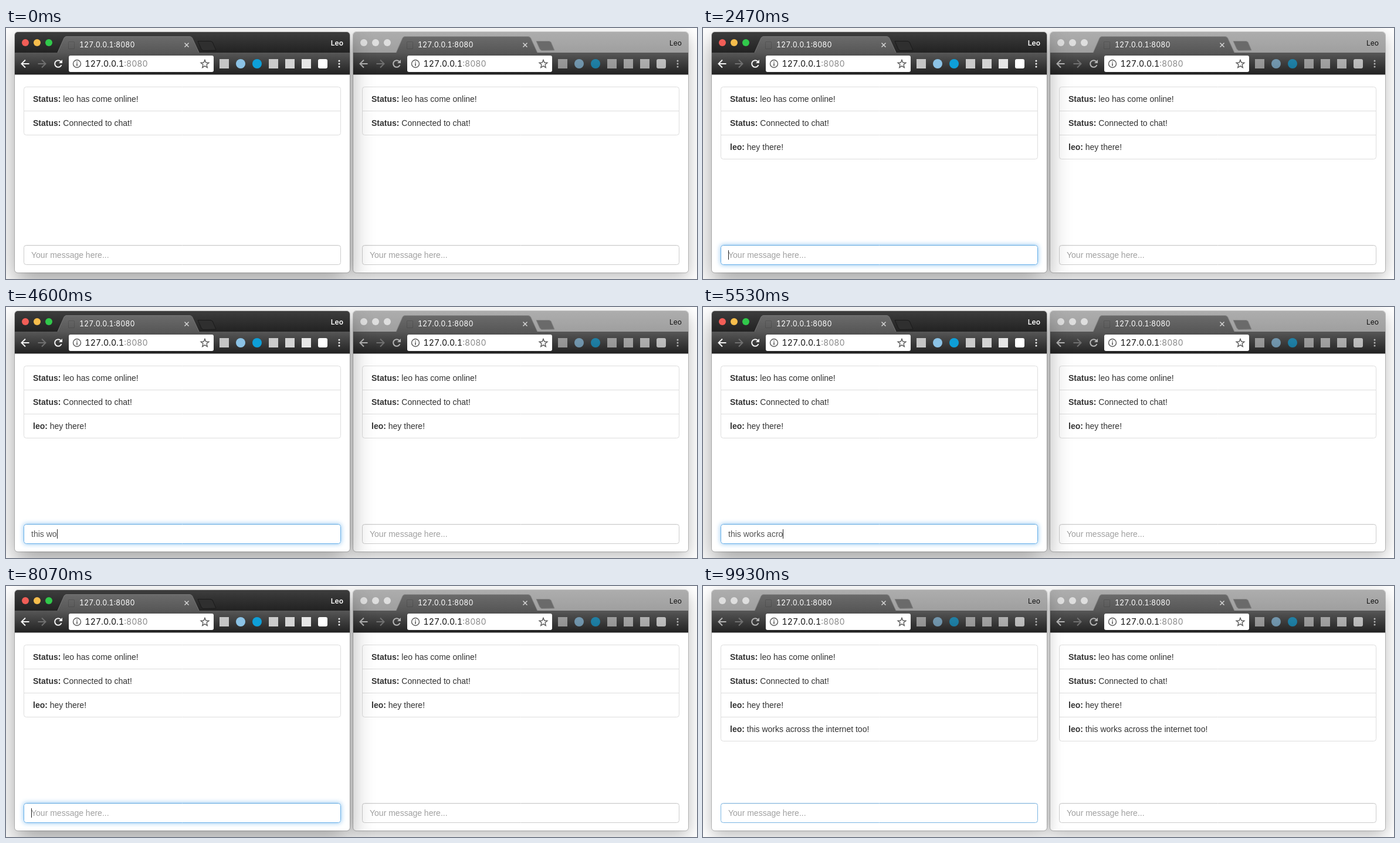
An HTML page with a canvas that plays this animation: 1178x428 px, repeating every 9.99 s.

```html
<!DOCTYPE html>
<html lang="en">
<head>
<meta charset="utf-8">
<title>Chat in two windows</title>
<style>
  html, body { margin: 0; width: 100%; height: 100%; overflow: hidden; background: #fff; }
  #stage { position: relative; width: 1178px; height: 428px; overflow: hidden; }
  canvas { position: absolute; left: 0; top: 0; }
  .label {
    position: absolute; line-height: 20px; white-space: pre;
    font-family: Inter, Roboto, sans-serif; font-variant-numeric: tabular-nums;
  }
  .title { left: 125px; top: 19px; font-size: 12.5px; color: #fff; }
  .url { left: 134.5px; top: 51px; font-size: 14.2px; color: #111; }
  .url span { color: #8a8a8a; }
  .user { right: 603px; top: 16px; font-size: 12px; color: #111; }
  .active .user { color: #fff; font-weight: 600; }
  .pane { position: absolute; left: 0; top: 0; width: 1178px; height: 428px; }
</style>
</head>
<body>
<div id="stage"><canvas id="view" width="1178" height="428"></canvas></div>
<script>
const LOOP = 9990;
const SHIFT = 577;
const FOCUS_AT = 700;
const BLUR_AT = 9860;
const FONT = "14px 'Liberation Sans', Arial, sans-serif";

const MESSAGES = [
  { text: "hey there!", start: 1150, step: 95, enter: 2200, shown: 2380 },
  { text: "this works across the internet too!", start: 3850, step: 118, enter: 8000, shown: 8200 }
];

const stage = document.getElementById("stage");
const ctx = document.getElementById("view").getContext("2d");

function addLabels(x) {
  const pane = document.createElement("div");
  pane.className = "pane";
  pane.style.left = x + "px";
  pane.innerHTML =
    '<div class="label title">127.0.0.1:8080</div>' +
    '<div class="label url">127.0.0.1<span>:8080</span></div>' +
    '<div class="label user">Leo</div>';
  stage.append(pane);
  return pane;
}

const leftPane = addLabels(0);
addLabels(SHIFT);

function gradient(y0, y1, from, to) {
  const g = ctx.createLinearGradient(0, y0, 0, y1);
  g.addColorStop(0, from);
  g.addColorStop(1, to);
  return g;
}

function box(x, y, w, h, r, fill, stroke) {
  ctx.beginPath();
  ctx.roundRect(x, y, w, h, r);
  paint(fill, stroke);
}

function disc(x, y, r, fill, stroke) {
  ctx.beginPath();
  ctx.arc(x, y, r, 0, Math.PI * 2);
  paint(fill, stroke);
}

function poly(points, fill, stroke) {
  ctx.beginPath();
  points.forEach(([x, y]) => ctx.lineTo(x, y));
  ctx.closePath();
  paint(fill, stroke);
}

function paint(fill, stroke) {
  if (fill) { ctx.fillStyle = fill; ctx.fill(); }
  if (stroke) { ctx.strokeStyle = stroke; ctx.stroke(); }
}

function line(points, color, width) {
  ctx.beginPath();
  points.forEach(([x, y]) => ctx.lineTo(x, y));
  ctx.lineWidth = width;
  ctx.strokeStyle = color;
  ctx.stroke();
  ctx.lineWidth = 1;
}

function text(str, x, y, color, bold) {
  ctx.font = (bold ? "bold " : "") + FONT;
  ctx.fillStyle = color;
  ctx.fillText(str, x, y);
  return ctx.measureText(str).width;
}

function frame(active) {
  ctx.save();
  ctx.shadowColor = active ? "rgba(0,0,0,.38)" : "rgba(0,0,0,.28)";
  ctx.shadowBlur = active ? 40 : 28;
  ctx.shadowOffsetY = active ? 16 : 8;
  box(15, 7, 571, 410, 5, "#fff");
  ctx.restore();
  box(14.5, 6.5, 572, 411, 5.5, null, "rgba(0,0,0,.2)");
}

function titleBar(active) {
  box(15, 7, 571, 35, [5, 5, 0, 0],
    active ? gradient(7, 42, "#3d3d3d", "#222") : gradient(7, 42, "#adadad", "#9f9f9f"));
  const lights = active ? ["#f25e57", "#f7bd4c", "#31c94b"] : ["#dedede", "#dedede", "#dedede"];
  lights.forEach((c, i) => disc(33 + 20 * i, 25, 6, c));

  ctx.lineJoin = "round";
  poly([[327, 22.5], [349, 22.5], [352, 24], [358, 38], [336, 38.5], [333, 36]],
    active ? "#2f2f2f" : "#6a6a6a", active ? "#1a1a1a" : "#858585");

  ctx.beginPath();
  ctx.moveTo(88, 42);
  ctx.lineTo(99, 17);
  ctx.quadraticCurveTo(100.5, 14.5, 103, 14.5);
  ctx.lineTo(313, 14.5);
  ctx.quadraticCurveTo(316, 14.5, 317.5, 17);
  ctx.lineTo(329, 42);
  paint(gradient(14, 42, "#6b6b6b", "#575757"), active ? "#777" : "#8a8a8a");

  box(106.5, 23.5, 10, 12, 1, null, "rgba(0,0,0,.14)");
  line([[304.5, 25.5], [311.5, 32.5]], "#d6d6d6", 1.5);
  line([[311.5, 25.5], [304.5, 32.5]], "#d6d6d6", 1.5);
}

function arrow(x, dir, color) {
  line([[x - 6.5 * dir, 61], [x + 6.5 * dir, 61]], color, 2);
  line([[x, 54.5], [x + 6.5 * dir, 61], [x, 67.5]], color, 2);
}

function reload(color) {
  ctx.beginPath();
  ctx.arc(89, 61, 5.8, -0.7, 0.35, true);
  ctx.lineWidth = 2;
  ctx.strokeStyle = color;
  ctx.stroke();
  ctx.lineWidth = 1;
  poly([[96, 54], [96, 60], [90, 60]], color);
}

function star(x, y) {
  const points = [];
  for (let i = 0; i < 10; i++) {
    const a = -Math.PI / 2 + i * Math.PI / 5;
    const r = i % 2 ? 3.2 : 7.2;
    points.push([x + r * Math.cos(a), y + 0.6 + r * Math.sin(a)]);
  }
  ctx.lineWidth = 1.4;
  poly(points, null, "#5a5a5a");
  ctx.lineWidth = 1;
}

function toolBar(active) {
  ctx.fillStyle = gradient(42, 79, "#575757", "#222");
  ctx.fillRect(15, 42, 571, 37.5);
  ctx.lineJoin = "miter";
  const ink = active ? "#f4f4f4" : "#b4b4b4";
  arrow(33, -1, ink);
  arrow(61, 1, "#707070");
  reload(ink);

  box(107, 47, 247, 28, 3, "#fff");
  ctx.lineWidth = 1.4;
  disc(121, 61, 6.5, null, "#5a5a5a");
  ctx.lineWidth = 1;
  ctx.fillStyle = "#5a5a5a";
  ctx.fillRect(120.2, 57.3, 1.6, 1.6);
  ctx.fillRect(120.2, 60, 1.6, 4.8);
  star(339, 61);

  ctx.globalAlpha = active ? 1 : 0.65;
  const icons = ["#c6c6c6", "#8cc3e6", "#0e9fd8", "#cbcbcb", "#d4d4d4", "#e6e6e6", "#fff"];
  icons.forEach((c, i) => {
    const x = 372 + 28 * i;
    if (i === 1 || i === 2) disc(x, 61, 8, c);
    else box(x - 8, 53, 16, 16, i === 6 ? 3 : 0, c);
  });
  for (const y of [56, 61, 66]) disc(568, y, 1.5, "#f4f4f4");
  ctx.globalAlpha = 1;
}

function chatList(rows) {
  box(30.5, 100.5, 540, 41 * rows.length, 4, "rgba(255,255,255,.4)", "#ddd");
  rows.forEach(([who, msg], i) => {
    const y = 100.5 + 41 * i;
    if (i) line([[31, y], [570, y]], "#ddd", 1);
    const w = text(who + ":", 46, y + 25.5, "#333", true);
    text(" " + msg, 46 + w, y + 25.5, "#333");
  });
}

function inputBox(typed, focus, glow, caret) {
  if (glow > 0) {
    ctx.save();
    ctx.shadowColor = `rgba(102,175,233,${0.75 * glow})`;
    ctx.shadowBlur = 8;
    box(30, 370, 541, 34, 4, "#fff");
    ctx.restore();
  }
  const k = focus;
  const mix = (a, b) => Math.round(a + (b - a) * k);
  box(30.5, 370.5, 540, 33, 4, "rgba(255,255,255,.4)",
    `rgb(${mix(204, 102)},${mix(204, 175)},${mix(204, 233)})`);
  line([[33, 371.5], [568, 371.5]], "rgba(0,0,0,.06)", 1);
  const w = typed ? text(typed, 43, 392, "#555") : 0;
  if (!typed) text("Your message here...", 43, 392, "#a0a0a0");
  if (caret) {
    ctx.fillStyle = "#222";
    ctx.fillRect(Math.round(43 + w), 379, 1, 16);
  }
}

function chatWindow(x, active, rows, input) {
  ctx.save();
  ctx.translate(x, 0);
  frame(active);
  titleBar(active);
  toolBar(active);
  chatList(rows);
  inputBox(...input);
  ctx.restore();
}

// Text in the box and the time of the last key press, for the caret's blink.
function typing(t) {
  let typed = "", last = FOCUS_AT;
  for (const m of MESSAGES) {
    if (t < m.start) break;
    const n = Math.min(m.text.length, Math.floor((t - m.start) / m.step) + 1);
    const sent = t >= m.enter;
    typed = sent ? "" : m.text.slice(0, n);
    last = sent ? m.enter : m.start + (n - 1) * m.step;
  }
  return { typed, last };
}

function draw(t) {
  const active = t < BLUR_AT;
  const rows = [["Status", "leo has come online!"], ["Status", "Connected to chat!"]];
  for (const m of MESSAGES) if (t >= m.shown) rows.push(["leo", m.text]);

  const { typed, last } = typing(t);
  const p = Math.max(0, Math.min(1, (t - FOCUS_AT) / 150));
  const ease = p * p * (3 - 2 * p);
  const caret = active && t >= FOCUS_AT && (t - last) % 1000 < 500;

  ctx.fillStyle = "#fff";
  ctx.fillRect(0, 0, 1178, 428);
  chatWindow(SHIFT, false, rows, ["", 0, 0, false]);
  chatWindow(0, active, rows, [typed, active ? ease : 0.8, active ? ease : 0, caret]);
  leftPane.classList.toggle("active", active);
}

function tick(now) {
  draw(now % LOOP);
  requestAnimationFrame(tick);
}

draw(0);
requestAnimationFrame(tick);
</script>
</body>
</html>
```
